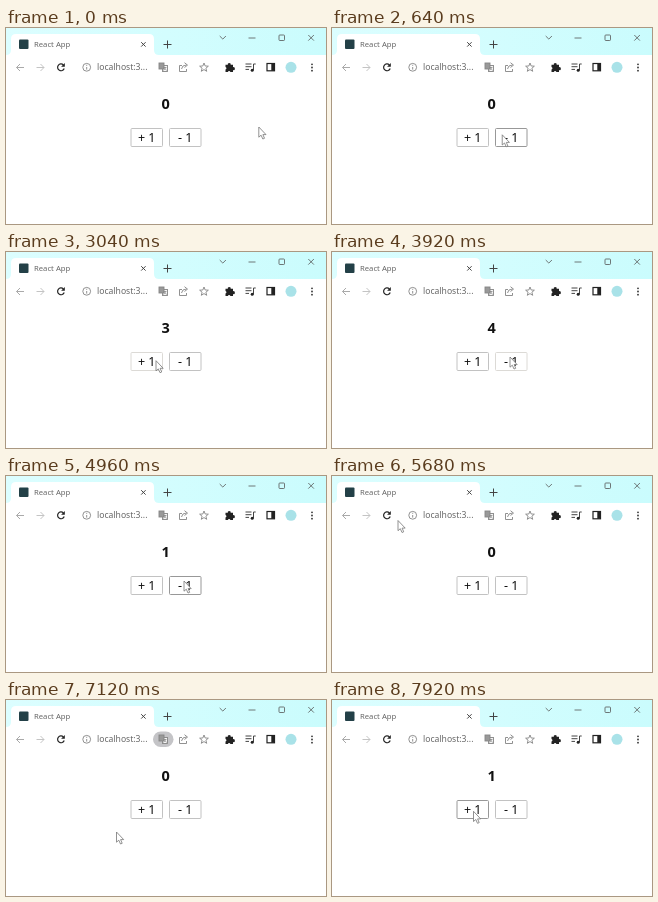
Animation, 320 px wide and 196 px high, one loop 8000 ms. Source, as an HTML page:

```html
<!DOCTYPE html>
<html lang="en">
<head>
<meta charset="utf-8">
<title>Counter</title>
<style>
  html, body { margin: 0; width: 100%; height: 100%; overflow: hidden; background: #fff; }
  svg { display: block; width: 100vw; height: 100vh; }
  text { font-family: "Noto Sans", "Open Sans", sans-serif; }
  .page { text-anchor: middle; fill: #111; }
  .line { fill: none; stroke: #444; }
  .thin { fill: none; stroke: #555; stroke-width: .8; }
  .soft { fill: none; stroke: #858585; stroke-width: .9; }
  .bold { fill: none; stroke: #222; stroke-width: 1.2; }
</style>
</head>
<body>
<svg viewBox="0 0 320 196" preserveAspectRatio="none">
  <defs>
    <linearGradient id="bar">
      <stop offset="0" stop-color="#dcfeff"/>
      <stop offset="1" stop-color="#cafcfd"/>
    </linearGradient>
  </defs>
  <rect width="320" height="196" fill="#fff"/>

  <!-- title bar and tab -->
  <rect width="320" height="27" fill="url(#bar)"/>
  <path d="M0 27Q5 27 5 22V11Q5 6 10 6H143Q148 6 148 11V22Q148 27 153 27V28H0Z" fill="#fff"/>
  <rect x="13" y="11.5" width="9.5" height="9.5" rx="1" fill="#234047"/>
  <text x="28" y="19.2" font-size="7.7" fill="#666">React App</text>
  <path class="line" d="M135.2 14.2l4.400 4.400M139.600 14.200l-4.400 4.400"/>
  <path class="line" d="M157.500 16.500h8M161.500 12.500v8"/>
  <path class="thin" d="M213.700 8l3.100 3.100L219.900 8M242.500 10h7M302.300 7l5.600 5.600M307.900 7l-5.600 5.600"/>
  <rect class="thin" x="273" y="7" width="5.500" height="5.500" rx=".8"/>

  <!-- toolbar -->
  <path class="line" style="stroke:#aaa" d="M18 39.500h-7.500M14 36l-3.500 3.500 3.500 3.500"/>
  <path class="line" style="stroke:#c4c4c4" d="M30.500 39.500H38M34.500 36l3.500 3.500-3.500 3.500"/>
  <path class="bold" d="M57.400 36.900A3.400 3.400 0 1 0 58.200 40.500"/>
  <path d="M58.800 35v3.700h-3.700z" fill="#222"/>
  <circle class="soft" cx="80.700" cy="39.300" r="3.900"/>
  <path class="soft" d="M80.700 39v2.600M80.700 36.800v1"/>
  <text x="91" y="42.200" font-size="8.600" fill="#666">localhost:3...</text>
  <rect id="pill" x="147" y="31.500" width="20.500" height="15.500" rx="7.750" fill="#c4c4c7"/>
  <g class="soft">
    <rect x="156.500" y="37.500" width="5" height="6" fill="#f5f5f5"/>
    <rect x="153" y="35" width="5" height="6" fill="#999"/>
    <path d="M157.500 39.500h3M159 39v1.500l-1.500 2M159 40.500l1.500 2" stroke-width=".7"/>
  </g>
  <path class="soft" d="M176 37.500h-2.500v6h7V41M175.500 41q.5-4 5-4M178.500 34.700l3 2.400-3 2.400"/>
  <path class="soft" id="star"/>
  <path d="M219.500 36.800h2.300a1.500 1.500 0 1 1 2.900 0h2.300v2.400a1.500 1.500 0 1 1 0 2.900V44h-2.600a1.400 1.400 0 0 0-2.600 0h-2.300v-2.600a1.300 1.300 0 0 0 0-2.500z" fill="#222"/>
  <path class="line" d="M239.500 36h6M239.500 38.700h6M239.500 41.400h3.500M247.500 42v-6h2.200"/>
  <circle cx="246.200" cy="42.200" r="1.500" fill="#222"/>
  <rect class="bold" x="261" y="35.500" width="7.500" height="7.300"/>
  <rect x="265.300" y="35.500" width="3.200" height="7.300" fill="#222"/>
  <circle cx="285" cy="39.300" r="5.500" fill="#a9e2e8"/>
  <g fill="#333"><circle cx="306" cy="36.300" r=".9"/><circle cx="306" cy="39.500" r=".9"/><circle cx="306" cy="42.700" r=".9"/></g>

  <!-- page -->
  <text class="page" id="count" x="159.600" y="80.500" font-size="14.500" font-weight="bold">0</text>
  <rect id="plus" x="125" y="100.500" width="31.500" height="18" rx="1" fill="#fff"/>
  <rect id="minus" x="163.500" y="100.500" width="31.500" height="18" rx="1" fill="#fff"/>
  <text class="page" x="140.700" y="114" font-size="12.500">+ 1</text>
  <text class="page" x="179.200" y="114" font-size="12.500">- 1</text>

  <path id="cursor" d="M0 0V10.200L2.300 8.200 4 12 5.700 11.300 4.100 7.600H7.200Z" fill="#fff" stroke="#777" stroke-width=".8" stroke-linejoin="round"/>
</svg>
<script>
const LOOP = 8000;
const $ = id => document.getElementById(id);

// start, end, x, y of each pointer move
const home = [252.8, 99];
const moves = [
  [40, 880, 150, 108.7],
  [3400, 3760, 178, 105],
  [5120, 5680, 66, 44.5],
  [5760, 5920, 56, 39],
  [6160, 6800, 110.5, 132],
  [7200, 7720, 141.5, 111.3]
];
// press, release, change
const clicks = [
  [1500, 1600, 1], [2160, 2240, 1], [2640, 2720, 1], [3030, 3120, 1],
  [3920, 4080, -1], [4320, 4400, -1], [4640, 4720, -1], [5000, 5080, -1],
  [7740, 7840, 1]
];

const clamp = v => Math.max(0, Math.min(1, v));
const ease = u => u * u * (3 - 2 * u);

function pointer(t) {
  let [x, y] = home, from = home;
  for (const [a, b, nx, ny] of moves) {
    const k = ease(clamp((t - a) / (b - a)));
    x += (nx - from[0]) * k;
    y += (ny - from[1]) * k;
    from = [nx, ny];
  }
  return [x, y];
}

function paintButton(id, left, sign, x, y, t) {
  const over = x > left && x < left + 32 && y > 100 && y < 119;
  const down = clicks.some(([a, b, d]) => d === sign && t >= a && t < b);
  $(id).setAttribute("stroke", down ? "#dcdad6" : over ? "#989898" : "#c2c2c2");
}

function render(t) {
  const [x, y] = pointer(t);
  $("cursor").setAttribute("transform", `translate(${x} ${y})`);
  $("count").textContent = clicks.reduce((n, [, b, d]) => n + (t >= b ? d : 0), 0);
  paintButton("plus", 125, 1, x, y, t);
  paintButton("minus", 163.5, -1, x, y, t);
  $("pill").setAttribute("opacity", clamp((t - 6480) / 160) * clamp((7440 - t) / 160));
}

const star = Array.from({ length: 10 }, (_, i) => {
  const r = i % 2 ? 2 : 4.6, a = i * Math.PI / 5;
  return `${(198 + r * Math.sin(a)).toFixed(2)} ${(39.6 - r * Math.cos(a)).toFixed(2)}`;
});
$("star").setAttribute("d", `M${star.join("L")}Z`);

const begin = performance.now();
function tick() {
  render((performance.now() - begin) % LOOP);
  requestAnimationFrame(tick);
}
tick();
</script>
</body>
</html>
```
